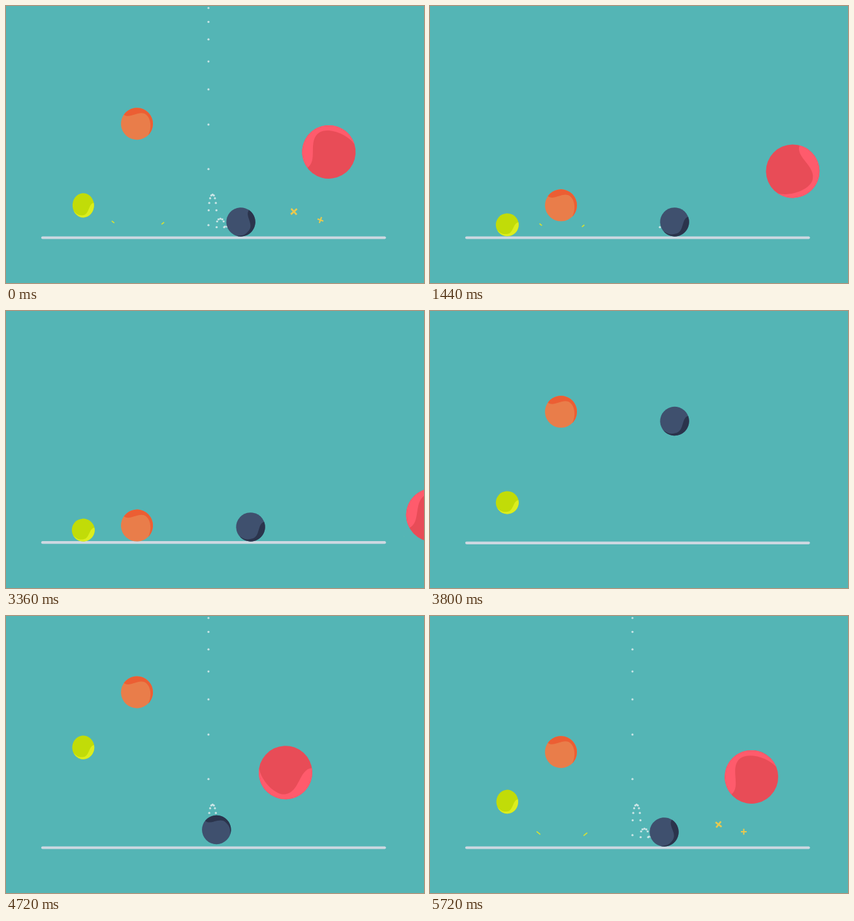
An HTML page with a canvas for the animation above (5.76 s loop, 640x425 px).

```html
<!DOCTYPE html>
<html lang="en">
<head>
<meta charset="utf-8">
<title>Bouncing balls</title>
<style>
html, body { margin: 0; width: 100%; height: 100%; overflow: hidden; background: #54b5b5; }
canvas { display: block; }
</style>
</head>
<body>
<canvas id="stage" width="640" height="425"></canvas>
<script>
const ctx = document.getElementById('stage').getContext('2d');
const LOOP = 5760, START = 4200, JUMP = 9140, FLOOR = 353.6, RAD = Math.PI / 180;

// Landing times: the given ones, then hops shrinking by a constant ratio
function landings(first, hop, ratio, shortest = 8) {
  const hits = [...first];
  for (; hop > shortest; hop *= ratio) hits.push(hits[hits.length - 1] + hop);
  return hits;
}

// fall: impact speed, half acceleration, pause on the floor; jump: delay, speed
const green = { x: 118.3, r: 17.5, base: '#c1dc08', patch: '#dcee1e', taper: 158, g: .004,
  hits: landings([4365, 4909, 5414, 5803], 311, .8), fall: [2.45, 0, 20], jump: [0, 2.1] };
const orange = { x: 200.5, r: 24.5, base: '#e97d4a', patch: '#ec5e33', taper: 183, g: .0056,
  hits: landings([4465, 5017, 5613, 6119], 416, .82), fall: [2.355, .00377, 0], jump: [20, 2.34] };
const navy = { r: 22.2, base: '#3f506e', patch: '#2b344c', taper: 155,
  hits: [4440, 4726, 4988, 5088], peaks: [50, 13, 3], fall: [1.822, .0014, 0], jump: [50, 2.2] };
const red = { r: 41, base: '#e84c57', patch: '#ff5b6c', taper: 193, g: .0021,
  hits: landings([4790, 5629, 6401], 657, .817, 190), fall: [1.108, .00085, 0] };

// Drifts with decaying speed, then rolls off to the right
function redX(t) {
  const late = Math.max(0, t - 8425);
  return 399 + 255.5 * (1 - Math.exp((4360 - t) / 3000)) + 1.06e-4 * late * late;
}

function navyX(t) {
  const left = Math.max(0, 6960 - t) / 1200;
  return Math.max(310, 374.5 - 15 * left * left);
}

// Dots along the fall, then along each hop: start, width, height, count
const trail = [];
for (let i = 0; i < 8; i++) trail.push([310, 3 + 21.3 * (1.262 ** i - 1) / .262]);
for (const [x, w, h, n] of [[310, 12.5, 50, 10], [322.5, 11.5, 13, 6], [334, 18, 1, 6]]) {
  for (let i = 1; i <= n; i++) {
    const p = Math.PI * i / n;
    trail.push([x + w * (1 - Math.cos(p)) / 2, 339.3 - h * Math.abs(Math.sin(p)) ** .56]);
  }
}

function height(ball, t) {
  const { hits, fall: [speed, accel, pause], jump } = ball;
  if (jump && t > JUMP + jump[0]) {
    const s = t - JUMP - jump[0];
    return s * (jump[1] - .00475 * s);
  }
  if (t < hits[0]) {
    const s = Math.max(0, hits[0] - pause - t);
    return s * (speed - accel * s);
  }
  let i = 0;
  while (i < hits.length - 2 && t > hits[i + 1]) i++;
  const a = hits[i], b = hits[i + 1];
  if (t > b && jump) return 0;
  const curve = ball.peaks ? 4 * ball.peaks[i] / (b - a) ** 2 : ball.g / 2;
  return curve * (t - a) * (b - t);
}

// Width of the soft green ball: squashed at landings, stretched at speed
function widthFactor(t) {
  const speed = Math.abs(height(green, t + 4) - height(green, t - 4)) / 8;
  let near = 0, amp = 0;
  green.hits.slice(0, -1).forEach((hit, i) => {
    const q = 1 - Math.abs(t - hit) / 35;
    if (q > near) {
      near = q;
      amp = .27 * ((green.hits[i + 1] - hit) / 540) ** 2;
    }
  });
  return 1 + amp * near - .1 * Math.min(speed, 1.5) * (1 - near);
}

function drawBall(ball, x, t, turn, wide = 1) {
  const { r, taper } = ball, end = taper * RAD;
  const c = Math.cos(end), s = Math.sin(end);
  ctx.save();
  ctx.translate(x, FLOOR - height(ball, t) - r / wide);
  ctx.scale(r * wide, r / wide);
  ctx.rotate(turn * RAD);
  ctx.fillStyle = ball.base;
  ctx.beginPath();
  ctx.arc(0, 0, 1, 0, 7);
  ctx.fill();
  ctx.fillStyle = ball.patch;
  ctx.beginPath();
  ctx.moveTo(c, s);
  ctx.bezierCurveTo((c + s / 2) * .87, (s - c / 2) * .87, -.45, .83, -.05, .81);
  ctx.bezierCurveTo(.5, .77, .5, -.1, Math.cos(.12), -Math.sin(.12));
  ctx.arc(0, 0, 1, -.12, end);
  ctx.fill();
  ctx.restore();
}

function line(x0, y0, x1, y1, color, width, cap = 'butt') {
  ctx.strokeStyle = color;
  ctx.lineWidth = width;
  ctx.lineCap = cap;
  ctx.beginPath();
  ctx.moveTo(x0, y0);
  ctx.lineTo(x1, y1);
  ctx.stroke();
}

function drawTrail(t) {
  const x = navyX(t), y = FLOOR - navy.r - height(navy, t);
  ctx.fillStyle = '#cbe5e6';
  trail.forEach(([dx, dy], i) => {
    const reached = t > navy.hits[0] ? x >= dx : y >= dy;
    if (!reached || t > 5800 + 48 * (i + 1)) return;
    ctx.beginPath();
    ctx.arc(dx, dy, 1.6, 0, 7);
    ctx.fill();
  });
}

// Dashes thrown out by the orange ball
function drawDashes(t) {
  orange.hits.forEach((hit, i) => {
    const age = t - hit, next = orange.hits[i + 1];
    if (age < 0 || age > 195 || !(next - hit > 100)) return;
    const big = i < 2, k = big ? 4.5 : 1;
    const half = (big ? 5.5 : 3.6) * Math.sin(Math.PI * age / 195);
    const d = 30 + k * age * .055, y = 337 - k * age * .038;
    for (const side of [-1, 1]) {
      const cx = 202 + side * d, cy = y + side + 1;
      const dx = side * half * .78, dy = half * .62;
      line(cx - dx, cy + dy, cx + dx, cy - dy, '#dce32c', big ? 2 : 1.6);
    }
  });
}

function drawCross(x, y, size, angle) {
  ctx.save();
  ctx.translate(x, y);
  ctx.rotate(angle * RAD);
  line(-size, 0, size, 0, '#e8c94f', size * .45);
  line(0, -size, 0, size, '#e8c94f', size * .45);
  ctx.restore();
}

// Crosses thrown out by every fourth landing of the red ball
function drawCrosses(t) {
  red.hits.forEach((hit, i) => {
    const age = t - hit;
    if (i % 4 !== 1 || age < 0 || age > 350) return;
    const x = redX(hit) - 26;
    const size = (4.6 + age * .009) * Math.min(1, age / 50, (350 - age) / 150);
    const d = 17 + i * age * .025;
    drawCross(x - d, 328 + 2 * i - age * .11, size * 1.08, age * .25 + 15);
    drawCross(x + d, 333 + 4 * i - age * .065, size * .82, (age - 91) * .5);
  });
}

function drawSpeedLines(t) {
  const s = t - 4360;
  if (s < -100 || s > 80) return;
  const shrink = Math.min(1, (80 - s) / 80), lift = Math.min(0, s * 2.4);
  for (const [x, bottom, length] of [[114.5, 238, 46], [121.5, 302, 63]]) {
    line(x, bottom + lift - length * shrink, x, bottom + lift, '#b98d74', 1.6);
  }
}

function draw(now) {
  let t = now % LOOP;
  if (t < START) t += LOOP;

  ctx.fillStyle = '#54b5b5';
  ctx.fillRect(0, 0, 640, 425);

  const s = t - 9120;
  const kick = s > 0 && s < 680 ? -14 * Math.sin(s / 45) * Math.exp(-s / 160) : 0;
  line(56, 355.5 + kick, 579.7, 355.5 + kick, '#cdd8e1', 4.2, 'round');

  drawTrail(t);
  drawSpeedLines(t);
  drawDashes(t);
  drawCrosses(t);
  drawBall(green, green.x, t, -5, t > JUMP ? 1 : widthFactor(t));
  drawBall(orange, orange.x, t, 222);
  drawBall(navy, navyX(t), t, 2.32 * (navyX(t) - 374.5) - 14);
  drawBall(red, redX(t), t, 2.31 * (redX(t) - 585));
}

const begin = performance.now();
function tick() {
  draw(performance.now() - begin);
  requestAnimationFrame(tick);
}
tick();
</script>
</body>
</html>
```
